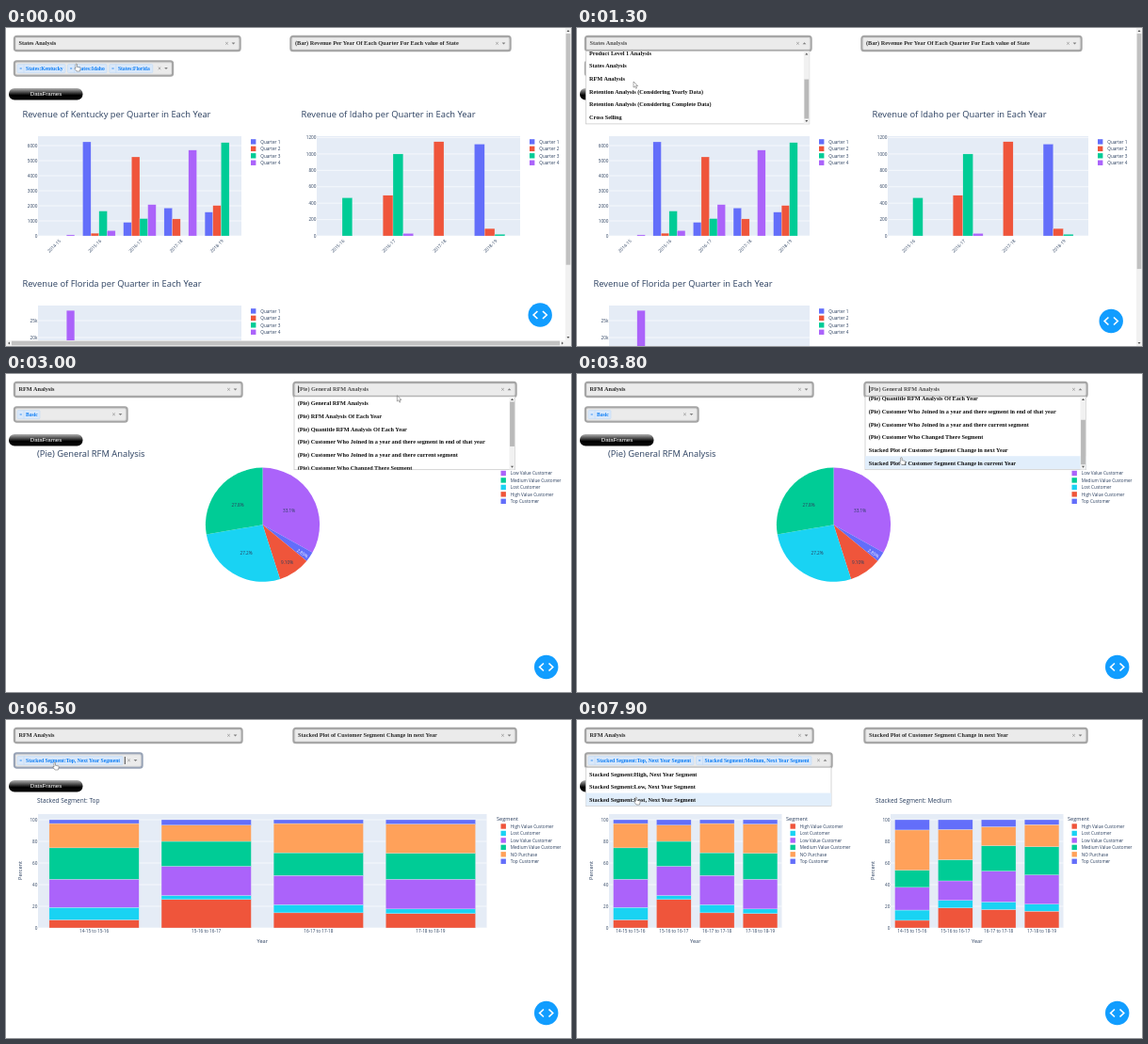
Animation, 600 px wide and 338 px high, one loop 8000 ms. Source, as an HTML page:

```html
<!DOCTYPE html>
<html lang="en">
<head>
<meta charset="utf-8">
<title>Analysis dashboard</title>
<style>
  html, body { margin: 0; width: 100%; height: 100%; overflow: hidden; background: #fff; }
  svg { display: block; width: 600px; height: 338px; }
  text { white-space: pre; }
  .plot { font-family: "Open Sans", sans-serif; fill: #2a3f5f; }
  .form { font-family: "Liberation Serif", "Times New Roman", serif; font-weight: bold; }
  .ui { font-family: "Liberation Sans", Arial, sans-serif; }
</style>
</head>
<body>
<svg id="stage" viewBox="0 0 600 338" xmlns="http://www.w3.org/2000/svg"></svg>
<script>
const LOOP = 8000, STEP = 100;
const BLUE = '#636efa', RED = '#ef553b', GREEN = '#00cc96',
      PURPLE = '#ab63fa', ORANGE = '#ffa15a', CYAN = '#19d3f3';

// ---- drawing helpers ----
const rect = (x, y, w, h, fill, extra = '') =>
  `<rect x="${x}" y="${y}" width="${w}" height="${h}" fill="${fill}" ${extra}/>`;
const path = (d, extra) => `<path d="${d}" ${extra}/>`;
const line = (d, color, width = 0.7) =>
  path(d, `fill="none" stroke="${color}" stroke-width="${width}"`);
const text = (x, y, s, size, cls = 'plot', extra = '') =>
  `<text x="${x}" y="${y}" font-size="${size}" class="${cls}" ${extra}>${s}</text>`;
const END = 'text-anchor="end"', MID = 'text-anchor="middle"';
const TITLE = 9.36, TICK = 4.67, AXIS = 5.6, FORM = 6.24;

function legend(x, y, items) {
  return items.map(([name, color], i) =>
    rect(x, y + i * 7.45 - 2.7, 5.4, 5.4, color) +
    text(x + 10.3, y + i * 7.45 + 1.8, name, TICK)).join('');
}

// ---- grouped bars ----
const QUARTERS = [BLUE, RED, GREEN, PURPLE].map((c, i) => ['Quarter ' + (i + 1), c]);
const REVENUE = [
  { name: 'Kentucky', x: 34, top: 115, base: 221, unit: 0.016, tick: 1000, ticks: 6, year: 2014,
    data: [[0, 0, 0, 70], [6250, 180, 1650, 350], [900, 5250, 1150, 2080],
           [1850, 1130, 0, 5700], [1580, 2020, 6200, 0]] },
  { name: 'Idaho', x: 330, top: 115, base: 221, unit: 0.0871, tick: 200, ticks: 6, year: 2015,
    data: [[0, 0, 465, 0], [0, 495, 1000, 30], [0, 1150, 0, 0], [1120, 90, 20, 0]] },
  { name: 'Florida', x: 34, top: 295, base: 401, unit: 0.0036, tick: 5000, ticks: 5, year: 2014,
    data: [[0, 0, 0, 28000], [], [], [], []] }
];

function revenueChart(c, width) {
  const slot = width / c.data.length, bar = slot * 0.2;
  let out = text(c.x - 16.5, c.top - 19.8, `Revenue of ${c.name} per Quarter in Each Year`, TITLE) +
    rect(c.x, c.top, width, c.base - c.top, '#e5ecf6');
  for (let i = 0; i <= c.ticks; i++) {
    const v = i * c.tick, y = c.base - v * c.unit;
    out += line(`M${c.x} ${y}h${width}`, '#fff', 0.6) +
      text(c.x - 0.6, y + 1.7, v >= 10000 ? v / 1000 + 'k' : v, TICK, 'plot', END);
  }
  c.data.forEach((row, i) => {
    const mid = c.x + slot * (i + 0.5), year = c.year + i;
    row.forEach((v, q) => {
      if (v) out += rect(mid + (q - 2) * bar, c.base - v * c.unit, bar, v * c.unit,
        QUARTERS[q][1], 'stroke="#e5ecf6" stroke-width=".25"');
    });
    out += text(0, 0, `${year}-${year - 1999}`, TICK, 'plot',
      `${END} transform="translate(${mid + 2.8} ${c.base + 5.7}) rotate(-45)"`);
  });
  return out + legend(c.x + width + 10, c.top + 5.9, QUARTERS);
}

// ---- pie ----
const PIE = [
  ['Low Value Customer', PURPLE, 33.1, 300.5, 146.5],
  ['Top Customer', BLUE, 2.85, 314, 192],
  ['High Value Customer', RED, 9.1, 298.5, 202],
  ['Lost Customer', CYAN, 27.2, 255, 192],
  ['Medium Value Customer', GREEN, 27.75, 246, 140.7]
];

function pieChart() {
  const cx = 272.5, cy = 160.2, r = 60.6;
  const at = p => {
    const a = p / 50 * Math.PI;
    return `${cx + r * Math.sin(a)} ${cy - r * Math.cos(a)}`;
  };
  let sum = 0, out = text(33, 88, '(Pie) General RFM Analysis', TITLE);
  for (const [, color, v] of PIE) {
    out += path(`M${cx} ${cy}L${at(sum)}A${r} ${r} 0 0 1 ${at(sum + v)}Z`, `fill="${color}"`);
    sum += v;
  }
  for (const [, color, v, x, y] of PIE) {
    out += text(x, y, v.toPrecision(3) + '%', TICK, 'plot',
      MID + (color === BLUE ? ` style="fill:#fff" transform="rotate(34 ${x} ${y})"` : ''));
  }
  return out + legend(525.5, 105.5, [0, 4, 3, 2, 1].map(i => PIE[i]));
}

// ---- stacked bars: running totals from the bottom ----
const SEGMENTS = [['High Value Customer', RED], ['Lost Customer', CYAN], ['Low Value Customer', PURPLE],
  ['Medium Value Customer', GREEN], ['NO Purchase', ORANGE], ['Top Customer', BLUE]];
const TOP = [[7.5, 19, 45, 74, 96.5, 100], [26.3, 30, 57, 80, 95, 100],
  [14, 21.5, 48.5, 69.5, 96.5, 100], [13.3, 17.5, 45, 69, 96, 100]];
const MEDIUM = [[7, 16.5, 37.5, 53.3, 90.5, 100], [18.5, 25.5, 43.5, 63, 91, 100],
  [17, 24, 52.5, 76, 93.5, 100], [15.5, 22, 49, 75, 95.5, 100]];

function stackedChart(name, totals, x, width, legendX) {
  const base = 221, unit = 1.15, slot = width / 4;
  let out = text(x < 99 ? 33 : 317, 88, 'Stacked Segment: ' + name, 6.53) +
    rect(x, 100, width, 121, '#e5ecf6');
  for (let v = 0; v <= 100; v += 20) {
    const y = base - v * unit;
    out += line(`M${x} ${y}h${width}`, '#fff', 0.6) + text(x - 0.6, y + 1.7, v, TICK, 'plot', END);
  }
  totals.forEach((col, i) => {
    col.forEach((v, k) => {
      const from = k ? col[k - 1] : 0;
      out += rect(x + slot * (i + 0.1), base - v * unit, slot * 0.8, (v - from) * unit,
        SEGMENTS[k][1], 'stroke="#e5ecf6" stroke-width=".3"');
    });
    out += text(x + slot * (i + 0.5), 226.3, `${14 + i}-${15 + i} to ${15 + i}-${16 + i}`, TICK, 'plot', MID);
  });
  return out + text(x + width / 2, 237, 'Year', AXIS, 'plot', MID) +
    text(0, 0, 'Percent', AXIS, 'plot', `${MID} transform="translate(${x - 17} 160) rotate(-90)"`) +
    text(legendX, 107, 'Segment', AXIS) + legend(legendX + 4.5, 113, SEGMENTS);
}

function toolbar() {
  const g = '#a3a8b3', y = 81.5;
  return rect(495, 79.5, 6, 4.5, g, 'rx=".8"') + `<circle cx="498" cy="81.8" r="1.2" fill="#fff"/>` +
    `<circle cx="509.5" cy="80.8" r="2" fill="none" stroke="#666" stroke-width="1.1"/>` +
    line('M511 82.3l2 2', '#666', 1.1) +
    line(`M516.8 ${y}h6M519.8 78.5v6`, g, 0.9) +
    rect(526.3, 78.8, 5.4, 5.4, 'none', `stroke="${g}" stroke-width=".8" stroke-dasharray="1 .7"`) +
    `<ellipse cx="538.5" cy="80.8" rx="2.8" ry="1.8" fill="none" stroke="${g}" stroke-width=".9"/>` +
    line('M536.4 82l.6 2.5', g, 0.9) +
    rect(548, 78.7, 5.6, 5.6, '#8f95a1') + line(`M549.3 ${y}h3M550.8 80v3`, '#fff', 0.8) +
    rect(557.4, 78.7, 5.6, 5.6, '#8f95a1') + line(`M558.7 ${y}h3`, '#fff', 0.8) +
    line('M567 78.8l5.4 5.4M572.4 78.8l-5.4 5.4', g, 1) +
    path('M576 82l3.3-3 3.3 3h-1v2.3h-4.6V82z', `fill="${g}"`) +
    rect(588.3, 78.5, 6, 6, '#444');
}

// ---- form parts ----
function control(left, right, y, opt = {}) {
  const { value, open, focus, muted } = opt, cy = y + 8.3, c = right - 8;
  const border = focus && !open ? '#98a3b6' : '#a5a5a5';
  const ink = muted ? '#a5a5a5' : open ? '#505050' : '#2b2b2b';
  let out = rect(left + 0.9, y + 0.9, right - left - 1.8, 15.3, '#ebebeb',
    `rx="2.5" stroke="${border}" stroke-width="2.2"`) +
    rect(left + 2.4, y + 2.4, right - left - 4.8, 12.3, 'none', 'rx="1.5" stroke="#d4d4d4" stroke-width=".6"');
  if (value) out += text(left + 5.5, cy + 2.1, value, FORM, 'form', `fill="${ink}"`);
  if (!muted) out += line(`M${c - 8.3} ${cy - 1.3}l2.6 2.6m0 -2.6l-2.6 2.6`, '#8a8a8a', 0.7);
  return out + path(open ? `M${c - 1.9} ${cy + 1}h3.8l-1.9 -2.1z` : `M${c - 1.9} ${cy - 0.8}h3.8l-1.9 2.1z`,
    'fill="#808080"');
}

const chip = (x, w, s) =>
  rect(x, 38.6, w, 9, '#d9e8fa', 'rx="1" stroke="#b9d6f7" stroke-width=".5"') +
  line(`M${x + 7} 38.6v9`, '#b9d6f7', 0.5) +
  line(`M${x + 2.7} 42l2 2m0 -2l-2 2`, '#3d94f5', 0.6) +
  text(x + 9.1, 45, s, 5.6, 'form', 'fill="#0a7cf5"');

const ROW = 13.65;
function menu(x, y, w, h, items, scroll, hover) {
  const total = items.length * ROW, scrollable = total > h + 4;
  const offset = scrollable ? scroll * (total - h + 0.8) : 0;
  let out = rect(x, y, w, h, '#fff', 'stroke="#c4c4c4" stroke-width=".7"') +
    `<svg x="${x}" y="${y}" width="${w}" height="${h}">`;
  items.forEach((s, i) => {
    const top = i * ROW - offset;
    if (i === hover) out += rect(0, top, w, ROW, '#e1eefb');
    out += text(3.7, top + 9.4, s, FORM, 'form', 'fill="#111"');
  });
  if (scrollable) {
    const track = h - 11, size = track * h / total, pos = 5.5 + scroll * (track - size);
    out += rect(w - 6, 0, 6, h, '#f1f1f1') + rect(w - 5.4, pos, 4.8, size, '#b9b9b9') +
      path(`M${w - 4.5} 4h3l-1.5 -2zM${w - 4.5} ${h - 4}h3l-1.5 2z`, 'fill="#555"');
  }
  return out + '</svg>';
}

const PAGES = ['General Analysis', 'Customer Analysis', 'Product Analysis', 'Product Level 1 Analysis',
  'States Analysis', 'RFM Analysis', 'Retention Analysis (Considering Yearly Data)',
  'Retention Analysis (Considering Complete Data)', 'Cross Selling'];
const PLOTS = ['(Pie) General RFM Analysis', '(Pie) RFM Analysis Of Each Year',
  '(Pie) Quantitle RFM Analysis Of Each Year',
  '(Pie) Customer Who Joined in a year and there segment in end of that year',
  '(Pie) Customer Who Joined in a year and there current segment',
  '(Pie) Customer Who Changed There Segment',
  'Stacked Plot of Customer Segment Change in next Year',
  'Stacked Plot of Customer Segment Change in current Year'];
const next = s => `Stacked Segment:${s}, Next Year Segment`;
const LEVELS = ['Top', 'High', 'Medium', 'Low', 'Lost'];

const dataButton = () =>
  rect(3, 64, 78.5, 12.5, 'url(#shade)', 'rx="6"') +
  text(42.5, 72.4, 'DataFrames', 6.1, 'ui', `${MID} fill="#fff"`);

const codeButton = (x, y) => `<circle cx="${x}" cy="${y}" r="12.7" fill="#119dff"/>` +
  line(`M${x - 2.8} ${y - 4}l-4.2 4l4.2 4M${x + 2.8} ${y - 4}l4.2 4l-4.2 4`, '#fff', 1.7);

function scrollbars(horizontal) {
  const h = horizontal ? 332 : 338;
  let out = rect(594, 0, 6, h, '#f1f1f1') + rect(594.7, 6, 4.6, h * 0.74, '#c1c1c1') +
    path(`M595.5 4h3l-1.5 -2zM595.5 ${h - 4}h3l-1.5 2z`, 'fill="#555"');
  if (horizontal) out += rect(0, 332, 600, 6, '#f1f1f1') + rect(6, 332.7, 582, 4.6, '#c1c1c1') +
    path('M4 333.5v3l-2 -1.5zM590 333.5v3l2 -1.5z', 'fill="#555"');
  return out;
}

// ---- pointer: time, x, y, hand ----
const POINTER = [[0, 73, 38, 1], [500, 150, 17, 0], [700, 150, 17, 0], [1000, 100, 60, 0], [1300, 60, 57, 0],
  [1500, 45, 54, 1], [1600, 45, 54, 0], [2000, 218, 33, 0], [2600, 420, 16, 0], [2900, 420, 16, 0],
  [3300, 390, 60, 1], [3800, 342.7, 88.5, 1], [4100, 343, 82, 1], [4300, 341, 82, 0], [4600, 339, 83, 0],
  [4800, 330, 82, 0], [5200, 90, 43, 0], [5400, 88, 44, 0], [5700, 60, 56, 1], [5900, 58, 56, 1],
  [6200, 50, 45, 1], [6700, 50, 45, 1], [7000, 60, 69, 1], [7200, 60, 69, 1],
  [7500, 72, 50, 0], [7700, 68, 66, 1], [7900, 61, 82, 1], [8000, 61, 82, 1]];

function pointer(t) {
  const i = POINTER.findIndex((p, k) => t < POINTER[k + 1][0]);
  const a = POINTER[i], b = POINTER[i + 1], u = (t - a[0]) / (b[0] - a[0]), e = u * u * (3 - 2 * u);
  const x = a[1] + (b[1] - a[1]) * e, y = a[2] + (b[2] - a[2]) * e;
  const d = a[3]
    ? 'M1 0.5q.8 -.8 1.5 0v2.8l3 .6q.8 .3 .6 1.3l-.7 2.8h-3.4l-2.3 -3q0 -.9 1.3 -.2z'
    : 'M0 0v6.2l1.5 -1.3l1.1 2.4l1 -.5l-1 -2.3h2z';
  return path(d, `transform="translate(${x} ${y})" fill="#fff" stroke="#555" stroke-width=".5"`);
}

// ---- scenes ----
const within = (t, a, b) => t >= a && t < b;
const ramp = (t, a, b) => Math.min(1, Math.max(0, (t - a) / (b - a)));

function statesPage(t) {
  const full = t < 600, w = full ? 216 : 213, open = within(t, 600, 1600);
  let out = REVENUE.map(c => revenueChart(c, w)).join('') + dataButton() +
    control(8, 249.5, 8, { value: t < 1600 ? 'States Analysis' : 'RFM Analysis', open, focus: t >= 500 }) +
    control(301.5, 536.5, 8, { value: '(Bar) Revenue Per Year Of Each Quarter For Each value of State' }) +
    control(8, 178, 34.5) + chip(12, 51, 'States:Kentucky') + chip(65.5, 41.5, 'States:Idaho') +
    chip(109.8, 46, 'States:Florida');
  if (open) out += menu(9.3, 24.5, 237.5, 77.4, PAGES, ramp(t, 900, 1200), t >= 1400 ? 5 : -1);
  return out + scrollbars(full) + codeButton(567.2, full ? 305 : 311.5);
}

function segmentPage(t) {
  const plotOpen = within(t, 2800, 4200), stacked = t >= 4600, two = t >= 7300;
  const levelsOpen = within(t, 5300, 5900) || within(t, 6700, 7200) || t >= 7600;
  const right = t < 5900 ? 129.5 : t < 7200 ? 145.5 : 271.5;
  let out = '';
  if (two) out += stackedChart('Top', TOP, 34, 183.5, 222) + stackedChart('Medium', MEDIUM, 333, 183.5, 521);
  else if (stacked) out += stackedChart('Top', TOP, 34, 476.5, 521);
  else if (t >= 1900) out += pieChart();
  if (within(t, 4600, 5000)) out += toolbar();

  out += dataButton() +
    control(8, 251.5, 8, { value: 'RFM Analysis', focus: t < 2800 }) +
    control(304.5, 542.5, 8, { value: PLOTS[t < 4200 ? 0 : 6], open: plotOpen, focus: within(t, 2800, 5300) }) +
    control(8, right, 34.5, within(t, 4600, 5900)
      ? { value: 'Select...', muted: true, open: levelsOpen }
      : { open: levelsOpen, focus: t >= 5900 });
  if (t < 4600) out += chip(12, 24, 'Basic');
  if (t >= 5900) out += chip(12, 112, next('Top'));
  if (t >= 7200) out += chip(126.5, 122.5, next('Medium'));
  if (within(t, 5900, 7200)) out += line('M126.3 39v8', '#222', 0.8);

  if (plotOpen) {
    const hover = t < 3300 ? -1 : t < 3600 ? 5 : t < 4000 ? 7 : 6;
    out += line('M310.5 12.5v7.5', '#222', 0.8) +
      menu(306, 24, 234.5, 77.7, PLOTS, ramp(t, 3000, 3400), hover);
  }
  if (levelsOpen) {
    const gone = t < 5900 ? [] : t < 7200 ? ['Top'] : ['Top', 'Medium'];
    const items = LEVELS.filter(s => !gone.includes(s)).map(next);
    const hover = t < 5900 ? 0 : t < 7200 ? (t < 6900 ? 0 : 1) : t < 7700 ? 0 : t < 7800 ? 1 : 2;
    out += menu(9.3, 50.3, right - 10.8, items.length * ROW + 0.4, items, 0, hover);
  }
  return out + codeButton(573.7, 311.5);
}

const DEFS = `<defs><linearGradient id="shade" x1="0" y1="0" x2="0" y2="1">
  <stop offset="0" stop-color="#b4b4b4"/><stop offset=".45" stop-color="#2c2c2c"/>
  <stop offset=".6" stop-color="#000"/><stop offset="1" stop-color="#0a0a0a"/></linearGradient></defs>`;

const stage = document.getElementById('stage');
const start = performance.now();
let shown = -1;

function tick(now) {
  const t = Math.floor(Math.max(0, now - start) % LOOP / STEP) * STEP;
  if (t !== shown) {
    shown = t;
    stage.innerHTML = DEFS + (t < 1800 ? statesPage(t) : segmentPage(t)) + pointer(t);
  }
  requestAnimationFrame(tick);
}
tick(start);
</script>
</body>
</html>
```
